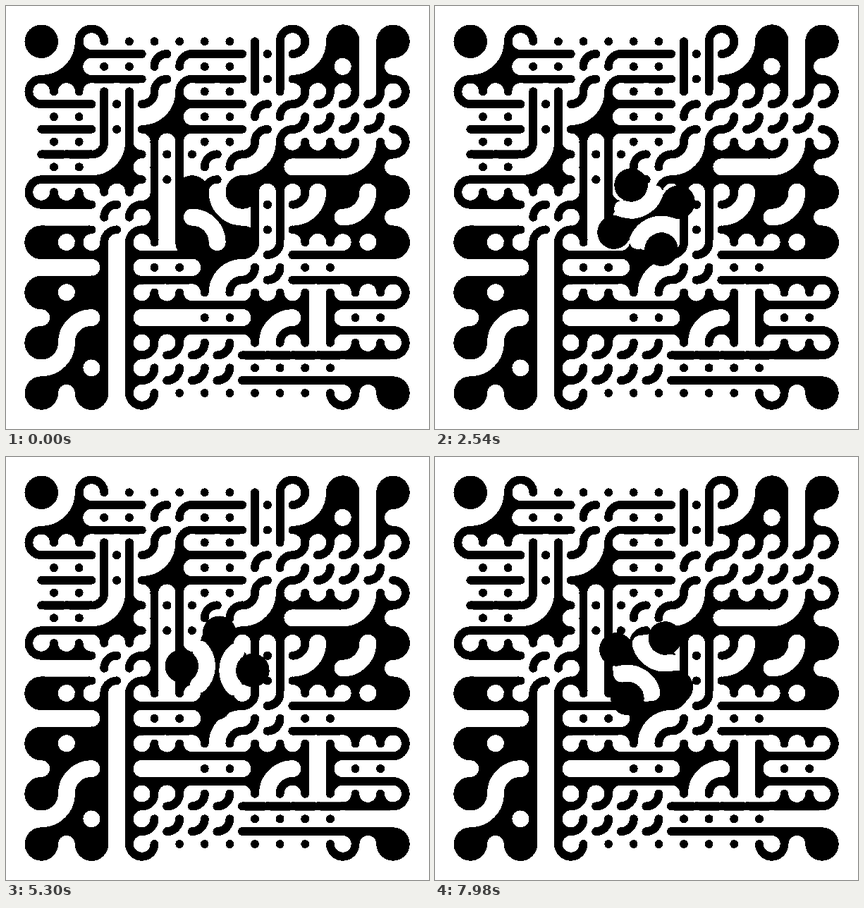
Recreate the animation shown at these times as an HTML page with a canvas. Size 600 by 600 pixels, loop 8000 ms.

```html
<!DOCTYPE html>
<html lang="en">
<head>
<meta charset="utf-8">
<title>Truchet tiles</title>
<style>
  html, body { margin: 0; width: 100%; height: 100%; overflow: hidden; background: #fff; }
  /* The contrast turns soft edges into hard black and white ones. */
  canvas { display: block; width: 600px; height: 600px; filter: contrast(100); }
</style>
</head>
<body>
<canvas id="stage" width="600" height="600"></canvas>
<script>
// One letter per cell: upper case is one large tile, lower case four small inverted ones.
// f: arc at top left, j: arc at bottom right, h: horizontal bar, v: vertical bar.
const MAP = [
  'FhjhvFV',
  'hvFhjff',
  'hFvjFHF',
  'HjV.vFF',
  'HVhJfhH',
  'JVHhJVh',
  'FVffhhH'
];
const SIZE = 71.25, CENTER = 299.6, MARGIN = CENTER - 3.5 * SIZE;
const LOOP = 8000;
// Quarter turns, timed in steps.
const TURNS = 4, FIRST_TURN = -0.9, TURN_PERIOD = 47.95, TURN_STEPS = 31.6;

const stage = document.getElementById('stage').getContext('2d');

function disc(c, x, y, r) {
  c.beginPath();
  c.arc(x, y, r, 0, 2 * Math.PI);
  c.fill();
}

function motif(c, kind, x, y, s) {
  const h = s / 2;
  c.lineWidth = s / 3;
  c.beginPath();
  if (kind === 'f') c.arc(x, y, h, 0, Math.PI / 2);
  if (kind === 'j') c.arc(x + s, y + s, h, Math.PI, 1.5 * Math.PI);
  if (kind === 'h') { c.moveTo(x, y + h); c.lineTo(x + s, y + h); }
  if (kind === 'v') { c.moveTo(x + h, y); c.lineTo(x + h, y + s); }
  if (kind === 'x') {
    c.arc(x + s, y, h, Math.PI / 2, Math.PI);
    c.moveTo(x, y + h);
    c.arc(x, y + s, h, -Math.PI / 2, 0);
  }
  c.stroke();
}

// Corner discs in the ground colour, then the motif and the edge discs on top.
function details(c, kind, x, y, s, ground, ink) {
  c.fillStyle = ground;
  for (const [i, j] of [[0, 0], [1, 0], [0, 1], [1, 1]]) disc(c, x + i * s, y + j * s, s / 3);
  c.fillStyle = c.strokeStyle = ink;
  motif(c, kind, x, y, s);
  for (const [i, j] of [[.5, 0], [1, .5], [.5, 1], [0, .5]]) disc(c, x + i * s, y + j * s, s / 6);
}

// Whole-pixel squares leave no seams between cells.
function cellSquare(c, x, y, colour) {
  const left = Math.round(x), top = Math.round(y);
  c.fillStyle = colour;
  c.fillRect(left, top, Math.round(x + SIZE) - left, Math.round(y + SIZE) - top);
}

function eachCell(visit) {
  MAP.forEach((row, j) => [...row].forEach((kind, i) =>
    visit(kind, MARGIN + i * SIZE, MARGIN + j * SIZE)));
}

function drawBoard() {
  const board = document.createElement('canvas');
  board.width = board.height = 600;
  const c = board.getContext('2d');
  c.fillStyle = '#fff';
  c.fillRect(0, 0, 600, 600);
  eachCell((kind, x, y) => {
    if (!/[A-Z]/.test(kind)) return;
    cellSquare(c, x, y, '#000');
    details(c, kind.toLowerCase(), x, y, SIZE, '#000', '#fff');
  });
  eachCell((kind, x, y) => {
    if (!/[a-z]/.test(kind)) return;
    cellSquare(c, x, y, '#fff');
    const s = SIZE / 2;
    for (let n = 0; n < 4; n++) {
      details(c, kind, x + (n % 2) * s, y + (n >> 1) * s, s, '#fff', '#000');
    }
  });
  return board;
}

// Steps come in groups of three, lasting 100, 20 and 20 ms.
function stepAt(ms) {
  const t = ms - 20;
  if (t < 0) return -1;
  const rest = t % 140;
  return 3 * Math.floor(t / 140) + (rest < 100 ? 0 : rest < 120 ? 1 : 2);
}

function angleAt(ms) {
  const step = stepAt(ms);
  let turns = 0;
  for (let n = 0; n < TURNS; n++) {
    const progress = (step - FIRST_TURN - n * TURN_PERIOD) / TURN_STEPS;
    turns += Math.min(1, Math.max(0, progress));
  }
  return turns * Math.PI / 2;
}

const board = drawBoard();

function render() {
  const ms = performance.now() % LOOP;
  stage.drawImage(board, 0, 0);
  stage.save();
  stage.translate(CENTER, CENTER);
  stage.rotate(angleAt(ms));
  stage.fillStyle = '#000';
  stage.fillRect(-SIZE / 2, -SIZE / 2, SIZE, SIZE);
  details(stage, 'x', -SIZE / 2, -SIZE / 2, SIZE, '#000', '#fff');
  stage.restore();
  requestAnimationFrame(render);
}
render();
</script>
</body>
</html>
```
